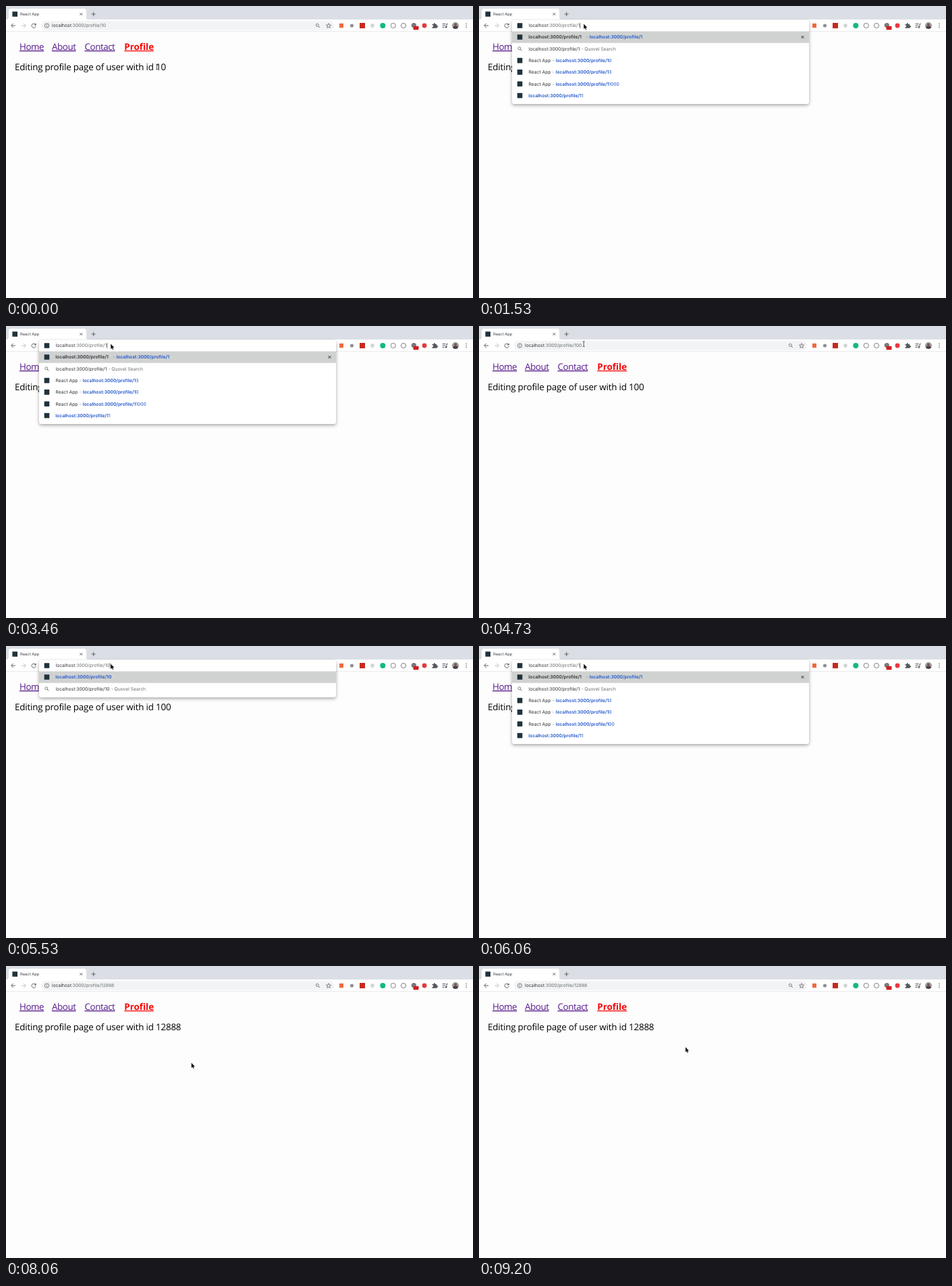
Write an HTML page that moves like this. It is 692 px wide and 432 px high and loops after 9260 ms.

```html
<!DOCTYPE html>
<html lang="en">
<head>
<meta charset="utf-8">
<title>React App</title>
<style>
  html, body { margin: 0; width: 100%; height: 100%; overflow: hidden; background: #fdfdfd; }
  svg { display: block; width: 692px; height: 432px; }
  text { text-rendering: geometricPrecision; white-space: pre; }
  .ui { font: 6.75px Inter, sans-serif; fill: #303236; }
  .tab { font: 5.8px Inter, sans-serif; fill: #3c4043; }
  .grey { fill: #6a6e73; }
  .bold { font-weight: 600; }
  .blue { fill: #1f55cc; }
  .body { font: 13.4px "Open Sans", sans-serif; letter-spacing: -.2px; fill: #000; }
  .link { letter-spacing: -.45px; fill: #551a8b; text-decoration: underline; }
  .active { letter-spacing: 0; font-weight: 700; fill: #f80808; }
  .line { fill: none; stroke: #5f6368; stroke-width: 1; }
  .panel { fill: #fff; filter: drop-shadow(0 2px 2.5px rgba(0, 0, 0, .34)); }
</style>
</head>
<body>
<svg viewBox="0 0 692 432">
  <rect width="692" height="432" fill="#fdfdfd"/>

  <!-- page -->
  <text class="body link" x="20" y="64.8">Home</text>
  <text class="body link" x="68" y="64.8">About</text>
  <text class="body link" x="116.5" y="64.8">Contact</text>
  <text class="body link active" x="175.3" y="64.8">Profile</text>
  <text class="body" id="para" x="13" y="94.8"></text>

  <!-- tab strip and toolbar -->
  <rect width="692" height="20" fill="#dbdfe5"/>
  <path d="M1 20Q4 20 4 17V8Q4 4 8 4H115Q119 4 119 8V17Q119 20 122 20Z" fill="#fff"/>
  <rect y="20" width="692" height="17.5" fill="#fff"/>
  <rect y="37.3" width="692" height=".7" fill="#e2e3e5"/>
  <g id="tabIcon"></g>
  <text class="tab" x="21" y="14.1">React App</text>
  <path class="line" d="M109.6 10.2l3.6 3.6m0-3.6l-3.6 3.6M126.7 12h6M129.7 9v6"/>
  <path class="line" d="M14 29H7.8M10.8 25.8L7.6 29l3.2 3.2"/>
  <path class="line" d="M23 29h6.2M26.2 25.8L29.4 29l-3.2 3.2" style="stroke:#bfc1c4"/>
  <g id="reload"></g>

  <!-- extensions -->
  <rect x="494" y="25.8" width="6" height="6.4" fill="#ee6a3c"/>
  <circle cx="512.5" cy="29" r="2.6" fill="#8d9196"/>
  <rect x="524" y="25" width="8" height="8" fill="#c9291f"/>
  <circle cx="543" cy="29" r="2.9" fill="#d3d5d7"/>
  <circle cx="558.3" cy="29" r="4" fill="#13b87c"/>
  <circle class="line" cx="573.7" cy="29" r="3.6" style="stroke-width:.8"/>
  <circle class="line" cx="589" cy="29" r="3.6" style="stroke-width:.8"/>
  <circle cx="604.3" cy="28.5" r="3.6" fill="#777b80"/>
  <rect x="603.5" y="29.8" width="8" height="5.4" rx="1" fill="#cf1f1f"/>
  <circle cx="620" cy="29" r="3.4" fill="#e8383b"/>
  <path d="M631.5 27h2.2a1.3 1.3 0 1 1 2.4 0h2.2v2.3a1.2 1.2 0 1 1 0 2.2v1.3h-6.8v-2a1.2 1.2 0 1 0 0-2.2Z" fill="#54585d"/>
  <path class="line" d="M646.5 26.5h5M646.5 29h5M646.5 31.5h3M653 31V26.5h1.8"/>
  <circle cx="652" cy="31.4" r="1.3" fill="#5f6368"/>
  <circle cx="666" cy="29" r="5" fill="#a39a98"/>
  <path d="M662.2 32.3a3.8 3 0 0 1 7.6 0a5 5 0 0 1-7.6 0Z" fill="#4a4048"/>
  <circle cx="666" cy="27.6" r="2" fill="#7a5750"/>
  <g fill="#5f6368">
    <circle cx="682" cy="26.2" r=".8"/><circle cx="682" cy="29" r=".8"/><circle cx="682" cy="31.8" r=".8"/>
  </g>

  <g id="menu"></g>
  <g id="bar"></g>
  <g id="pointer" stroke-linejoin="round">
    <path id="arrow" d="M0 0V7.4L1.7 5.9 2.9 8.5 4.1 8 2.9 5.4H5.2Z" fill="#111" stroke="#fff" stroke-width=".6" paint-order="stroke"/>
    <path id="beam" d="M-1.5-4Q0-4 0-3Q0-4 1.5-4M0-3V3M-1.5 4Q0 4 0 3Q0 4 1.5 4" fill="none" stroke="#333" stroke-width=".8"/>
  </g>
</svg>
<script>
const LOOP = 9260;
const $ = id => document.getElementById(id);

// [start, mode, id in the address bar, id on the page, suggested ids]
const states = [
  [0, 'view', '10', '10'],
  [1060, 'select', '10', '10'],
  [1260, 'caret', '10', '10'],
  [1400, 'edit', '1', '10', ['10', '13', '11000']],
  [1660, 'edit', '13', '10'],
  [1930, 'load', '13', '10'],
  [2130, 'view', '13', '13'],
  [2860, 'select', '13', '13'],
  [3060, 'caret', '13', '13'],
  [3330, 'edit', '1', '13', ['13', '10', '11000']],
  [3800, 'edit', '10', '13'],
  [4000, 'edit', '100', '13'],
  [4260, 'load', '100', '13'],
  [4460, 'view', '100', '100'],
  [4930, 'select', '100', '100'],
  [5130, 'caret', '100', '100'],
  [5400, 'edit', '10', '100'],
  [5660, 'edit', '1', '100', ['13', '10', '100']],
  [6460, 'edit', '12', '100'],
  [6600, 'edit', '128', '100'],
  [6730, 'edit', '1288', '100'],
  [6860, 'edit', '12888', '100'],
  [7110, 'load', '12888', '100'],
  [7270, 'view', '12888', '12888']
];

// pointer stops: time, x, y
const stops = [
  [0, 223.5, 90], [860, 155.2, 26.6], [7480, 155.2, 26.6],
  [8250, 296, 164], [8550, 298, 164], [9150, 306, 120], [LOOP, 306, 120]
];

const span = (cls, s, x) => `<tspan class="${cls}"${x ? ` x="${x}"` : ''}>${s}</tspan>`;
const text = (x, y, body) => `<text class="ui" x="${x}" y="${y + 2.35}">${body}</text>`;
const path = id => 'localhost:3000/profile/' + id;
const urlWidth = id => 76 + (id.length - 1) * 4.2;

const favicon = (x, y) => `<rect x="${x - 3.8}" y="${y - 3.8}" width="7.6" height="7.6" rx=".5" fill="#20323b"/>`;
const globe = y => `<circle cx="60.5" cy="${y}" r="3.2" fill="#6a6e73"/>
  <path d="M58.3 ${y - 1}l1.6 1.2v1.4M61 ${y - 2.4}l-.4 1.6 2 .8" fill="none" stroke="#e8eaed" stroke-width=".8"/>`;
const lens = (x, y) => `<circle class="line" cx="${x - .7}" cy="${y - .7}" r="2" style="stroke-width:.8"/>
  <path class="line" d="M${x + .8} ${y + .8}l2 2"/>`;
const info = `<circle class="line" cx="60.5" cy="29" r="3.1" style="stroke-width:.8"/>
  <path class="line" d="M60.5 28.6v2.2M60.5 27v.9" style="stroke-width:.8"/>`;
const star = `<path class="line" d="M478 25.7l1 2.3 2.5.2-1.9 1.6.6 2.5-2.2-1.3-2.2 1.3.6-2.5-1.9-1.6 2.5-.2Z" style="stroke-width:.8"/>`;

const icon = (id, y) => ['128', '1288', '12888', '12'].includes(id) ? globe(y) : favicon(60.5, y);

function barMarkup(mode, id) {
  const editing = mode === 'edit', x = editing ? 73.5 : 68, w = urlWidth(id);
  const focused = mode === 'select' || mode === 'caret';
  let out = '';
  if (!editing) {
    out += `<rect x="52" y="22.3" width="434" height="13.4" rx="6.7" fill="${focused ? '#fff' : '#f1f3f4'}"
      ${focused ? 'stroke="#4a86e8"' : ''}/>` + info + lens(462, 29) + star;
  } else {
    out += icon(id, 29);
  }
  if (mode === 'select') out += `<rect x="${x}" y="24.6" width="${w}" height="8.8" fill="#b4d5fe"/>`;
  out += text(x, 29, 'localhost' + span('grey', ':3000/profile/' + id));
  if (editing || mode === 'caret') out += `<rect x="${x + w + .1}" y="25" width=".6" height="8" fill="#222"/>`;
  return out;
}

function menuMarkup(mode, id, ids) {
  if (mode !== 'edit' && mode !== 'load') return '';
  const row = i => 46 + i * 17.3;
  const bottom = ids ? 145 : 76, top = mode === 'edit' ? 21 : 37.5;
  let out = `<rect class="panel" x="49" y="${top}" width="440" height="${bottom - top}" rx="3.5"/>
    <rect x="49" y="37.5" width="440" height="17.2" fill="#d0d2d2"/>`;
  out += icon(id, row(0));
  out += ids
    ? text(73.3, row(0), span('bold', path(id)) + span('grey', '-', 158.4) + span('bold blue', path(id), 163.4))
      + `<path class="line" d="M477.5 44l4 4m0-4l-4 4" style="stroke:#333"/>`
    : text(73.3, row(0), span('bold blue', path(id)));
  const end = 73.5 + urlWidth(id);
  out += lens(60.5, row(1))
    + text(73.5, row(1), path(id) + span('grey', '-', end + 2.2) + span('grey', 'Quovel Search', end + 6.8));
  if (ids) {
    ids.forEach((v, i) => {
      const y = row(i + 2);
      out += favicon(60.5, y) + text(73.5, y, 'React App' + span('grey', '-', 108.5)
        + span('bold blue', path('1'), 113.7) + span('blue', v.slice(1)));
    });
    out += favicon(60.5, row(5)) + text(73.3, row(5), span('bold blue', path('1')) + span('blue', '1'));
  }
  return out;
}

function show([, mode, id, pageId, ids]) {
  const loading = mode === 'load';
  $('para').textContent = 'Editing profile page of user with id ' + pageId;
  $('bar').innerHTML = barMarkup(mode, id);
  $('menu').innerHTML = menuMarkup(mode, id, ids);
  $('tabIcon').innerHTML = loading
    ? '<path d="M10 10a3.2 3.2 0 0 1 3-1.2" fill="none" stroke="#c5c8cc" stroke-width=".8"/>'
    : favicon(13.2, 12);
  $('reload').innerHTML = loading
    ? '<path class="line" d="M38.6 26.4l5.2 5.2m0-5.2l-5.2 5.2"/>'
    : '<path class="line" d="M43.6 27.2A3.1 3.1 0 1 0 44.2 30"/><path d="M44.7 25.2v3.3h-3.3Z" fill="#5f6368"/>';
}

function pointerAt(t) {
  const i = stops.findIndex((s, n) => n > 0 && t <= s[0]);
  const [a, b] = [stops[i - 1], stops[i]];
  const u = (t - a[0]) / (b[0] - a[0]), e = u * u * (3 - 2 * u);
  return [a[1] + (b[1] - a[1]) * e, a[2] + (b[2] - a[2]) * e];
}

let current;
function frame(now) {
  const t = now % LOOP;
  const state = states.filter(s => s[0] <= t).pop();
  if (state !== current) show(current = state);
  const [start, mode] = state;
  $('menu').setAttribute('opacity', mode === 'load' ? Math.max(0, 1 - (t - start) / 150) : 1);

  const [x, y] = pointerAt(t);
  const overBar = y > 21 && y < 37 && mode !== 'edit' && mode !== 'load';
  const overText = y > 82 && y < 98 && x < 260;
  const beam = overBar || overText;
  $('beam').style.display = beam ? '' : 'none';
  $('arrow').style.display = beam ? 'none' : '';
  $('pointer').setAttribute('transform', `translate(${x} ${y})`);
  requestAnimationFrame(frame);
}
frame(0);
</script>
</body>
</html>
```
